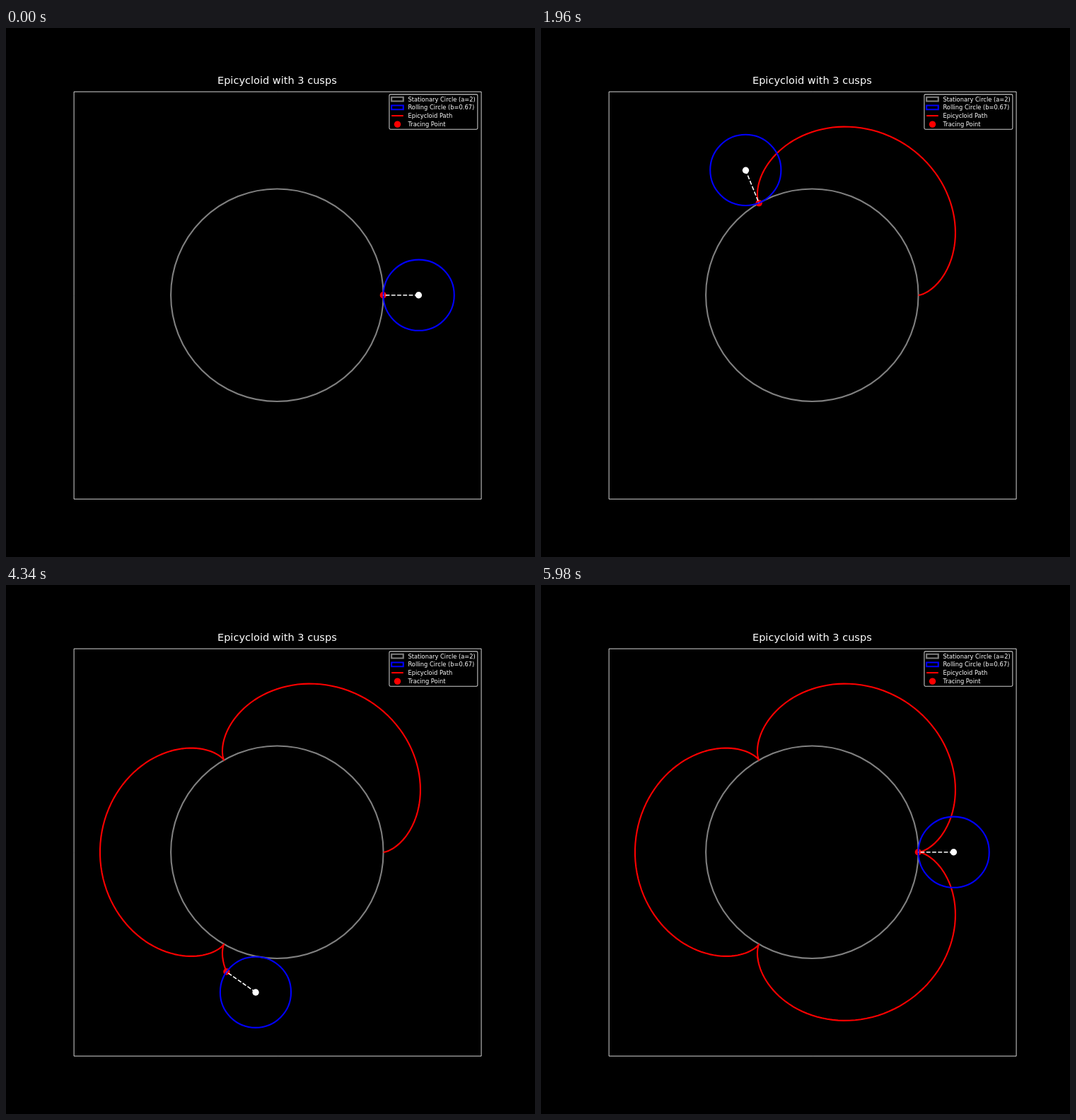
An HTML page with a canvas for the animation above (6000 ms loop, 748 by 748 pixels).

```html
<!DOCTYPE html>
<html lang="en">
<head>
<meta charset="utf-8">
<title>Epicycloid with 3 cusps</title>
<style>
  html, body { margin: 0; width: 100%; height: 100%; overflow: hidden; background: #000; }
  canvas { display: block; }
</style>
</head>
<body>
<canvas id="stage" width="748" height="748"></canvas>
<script>
const ctx = document.getElementById('stage').getContext('2d');

// The chart is laid out on a 1000-unit square, with sizes in points.
const ZOOM = 0.748;
const PT = 100 / 72;
const FONT = '"DejaVu Sans", Verdana, sans-serif';
const STEPS = 300;
const STEP_MS = 20;

const A = 2, B = 2 / 3;
const CX = 512.5, CY = 505;
const UNIT = 770 / (2 * (A + 2 * B + 0.5));
const THICK = 2 * PT;

const toStage = (x, y) => [CX + x * UNIT, CY - y * UNIT];
const angle = i => 2 * Math.PI * i / (STEPS - 1);
const hub = a => toStage((A + B) * Math.cos(a), (A + B) * Math.sin(a));

function tracer(a) {
  const k = (A + B) / B;
  return toStage(
    (A + B) * Math.cos(a) - B * Math.cos(k * a),
    (A + B) * Math.sin(a) - B * Math.sin(k * a)
  );
}

const curve = Array.from({ length: STEPS }, (_, i) => tracer(angle(i)));

function stroke(color, width) {
  ctx.strokeStyle = color;
  ctx.lineWidth = width;
  ctx.stroke();
}

function ring([x, y], r, color) {
  ctx.beginPath();
  ctx.arc(x, y, r * UNIT, 0, 2 * Math.PI);
  stroke(color, THICK);
}

function dot([x, y], color) {
  ctx.beginPath();
  ctx.arc(Math.round(x), Math.round(y), 4.5 * PT, 0, 2 * Math.PI);
  ctx.fillStyle = color;
  ctx.fill();
}

function polyline(points, color, width) {
  ctx.beginPath();
  points.forEach(p => ctx.lineTo(...p));
  stroke(color, width);
}

function text(str, x, y, size, align) {
  ctx.font = `${size * PT}px ${FONT}`;
  ctx.textAlign = align;
  ctx.fillStyle = '#fff';
  ctx.fillText(str, x, y);
}

function legend() {
  const left = 728.8, span = 16 * PT, firstBase = 138.4, rowGap = 15.67;

  ctx.beginPath();
  ctx.roundRect(724.5, 125.5, 167, 66, 2.2);
  ctx.fillStyle = 'rgba(0, 0, 0, 0.8)';
  ctx.fill();
  stroke('#ccc', PT);

  const box = color => y => {
    ctx.beginPath();
    ctx.rect(left, y - 2.8 * PT, span, 5.6 * PT);
    stroke(color, THICK);
  };
  const rows = [
    ['Stationary Circle (a=2)', box('#808080')],
    ['Rolling Circle (b=0.67)', box('#00f')],
    ['Epicycloid Path', y => polyline([[left, y], [left + span, y]], '#f00', THICK)],
    ['Tracing Point', y => dot([left + span / 2, y], '#f00')]
  ];
  rows.forEach(([label, symbol], n) => {
    const base = firstBase + n * rowGap;
    symbol(base - 2.8 * PT);
    text(label, left + span + 6.4 * PT, base, 8, 'left');
  });
}

function draw(i) {
  const a = angle(i);
  const center = hub(a);
  const tip = curve[i];

  ctx.setTransform(1, 0, 0, 1, 0, 0);
  ctx.fillStyle = '#000';
  ctx.fillRect(0, 0, 748, 748);
  ctx.scale(ZOOM, ZOOM);
  ctx.lineJoin = 'round';

  ring([CX, CY], A, '#808080');
  if (i > 0) polyline(curve.slice(0, i + 1), '#f00', THICK);
  dot(tip, '#f00');
  ring(center, B, '#00f');

  ctx.setLineDash([5.55 * PT, 2.4 * PT]);
  polyline([center, tip], '#fff', 1.5 * PT);
  ctx.setLineDash([]);
  dot(center, '#fff');

  ctx.lineJoin = 'miter';
  ctx.beginPath();
  ctx.rect(128.5, 120.5, 770, 770);
  stroke('#fff', 0.8 * PT);
  text('Epicycloid with 3 cusps', CX, 106.1, 14, 'center');
  legend();
}

const start = performance.now();

function tick() {
  const t = performance.now() - start;
  draw(Math.floor(t / STEP_MS + 0.001) % STEPS);
  requestAnimationFrame(tick);
}
tick();
</script>
</body>
</html>
```
